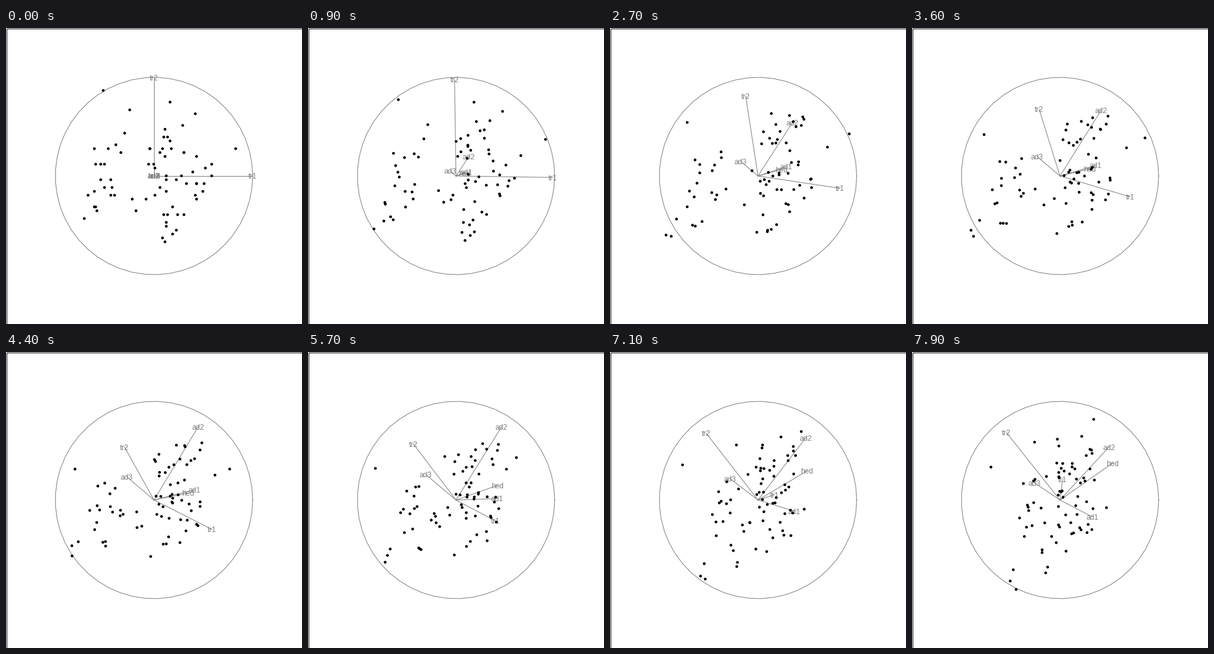
A matplotlib script that plays this animation: 480x480 px, repeating every 8000 ms.

```python
import numpy as np
import matplotlib.pyplot as plt
from matplotlib.animation import FuncAnimation

SIZE, DPI = 480, 100
MID, RADIUS = SIZE / 2, SIZE / 3
PX = 72 / DPI  # one pixel in points
GREY = "#7f7f7f"
LABELS = ["tr1", "tr2", "hed", "ad1", "ad2", "ad3"]

# Six measurements of 74 specimens, one array per variable
TR1 = np.array([
    191, 185, 200, 173, 171, 160, 188, 186, 174, 163, 190, 174, 201, 190, 182,
    184, 177, 178, 210, 182, 186, 158, 146, 151, 122, 138, 132, 131, 135, 125,
    130, 130, 138, 130, 143, 154, 147, 141, 131, 144, 137, 143, 135, 186, 211,
    201, 242, 184, 211, 217, 223, 208, 199, 211, 218, 203, 192, 195, 211, 187,
    192, 223, 188, 216, 185, 178, 187, 187, 201, 187, 210, 196, 195, 187])
TR2 = np.array([
    131, 134, 137, 127, 118, 118, 134, 129, 131, 115, 143, 131, 130, 133, 130,
    131, 127, 126, 140, 121, 136, 141, 119, 130, 113, 121, 115, 127, 123, 119,
    120, 131, 127, 116, 123, 135, 132, 131, 116, 121, 146, 119, 127, 107, 122,
    114, 131, 108, 118, 122, 127, 125, 124, 129, 126, 122, 116, 123, 122, 123,
    109, 124, 114, 120, 114, 119, 111, 112, 130, 120, 119, 114, 110, 124])
HED = np.array([
    53, 50, 52, 50, 49, 47, 54, 51, 52, 47, 52, 50, 51, 53, 51,
    51, 49, 53, 54, 51, 56, 58, 51, 51, 45, 53, 49, 51, 50, 51,
    48, 51, 52, 52, 54, 56, 54, 51, 47, 53, 53, 53, 52, 49, 49,
    47, 54, 43, 51, 49, 51, 50, 46, 49, 49, 49, 49, 47, 48, 47,
    46, 53, 48, 50, 46, 47, 49, 49, 54, 47, 50, 51, 49, 49])
AD1 = np.array([
    150, 147, 144, 144, 153, 140, 151, 143, 144, 142, 141, 150, 148, 154, 147,
    137, 134, 157, 149, 147, 148, 145, 140, 140, 131, 139, 139, 136, 129, 140,
    137, 141, 138, 143, 142, 144, 138, 140, 130, 137, 137, 136, 140, 120, 123,
    130, 131, 116, 122, 127, 132, 125, 119, 122, 120, 119, 123, 125, 125, 129,
    130, 129, 122, 129, 124, 120, 119, 119, 133, 121, 128, 129, 124, 129])
AD2 = np.array([
    15, 13, 14, 16, 13, 15, 14, 14, 14, 15, 13, 15, 13, 15, 14,
    14, 15, 14, 13, 13, 14, 8, 11, 11, 10, 11, 10, 12, 11, 10,
    9, 11, 9, 9, 11, 10, 10, 10, 9, 11, 10, 9, 10, 14, 16,
    14, 16, 16, 15, 15, 16, 14, 13, 13, 15, 14, 15, 15, 14, 14,
    13, 13, 12, 15, 15, 13, 16, 14, 13, 15, 14, 14, 13, 14])
AD3 = np.array([
    104, 105, 102, 97, 106, 99, 98, 110, 116, 95, 99, 105, 110, 106, 105,
    95, 105, 116, 107, 111, 111, 107, 111, 113, 102, 106, 98, 107, 107, 110,
    106, 108, 101, 111, 95, 123, 102, 106, 102, 104, 113, 105, 108, 84, 95,
    74, 90, 75, 90, 73, 84, 88, 78, 83, 85, 73, 90, 77, 73, 75,
    90, 82, 74, 86, 92, 78, 66, 55, 84, 86, 68, 86, 89, 88])


def standardise(cols):
    """Scale each variable to unit range, centre, fit the cloud to the stage."""
    x = np.column_stack(cols).astype(float)
    x /= np.ptp(x, axis=0)
    x -= x.mean(axis=0)
    return x / np.linalg.norm(x, axis=1).max() * MID


def orthonormal(xs, ys):
    u, _, vt = np.linalg.svd(np.column_stack([xs, ys]), full_matrices=False)
    return u @ vt


def geodesic(start, end):
    """Shortest path between two planes, as a function of 0..1."""
    u, cos, wt = np.linalg.svd(start.T @ end)
    tau = np.arccos(np.clip(cos, -1, 1))
    a = start @ u
    b = (end @ wt.T - a * np.cos(tau)) / np.sin(tau)
    return lambda t: (a * np.cos(t * tau) + b * np.sin(t * tau)) @ u.T


DATA = standardise([TR1, TR2, HED, AD1, AD2, AD3])
HOME = np.eye(6, 2)
TURN = orthonormal([82.6, -55.2, 57.9, 68.85, 72.1, -48.1],
                   [-55.2, 73.1, 10.25, 15.7, 123.5, 41.3])
LAST = orthonormal([4, -87, 85, 52, 79, -41],
                   [33.7, 109.7, 59.7, -27.3, 85.7, 27.7])
first_leg, second_leg = geodesic(HOME, TURN), geodesic(TURN, LAST)


def projection(i):
    if i < 49:
        return first_leg(i / 48.2)
    return second_leg((i - 49) / 30)


def to_stage(p):
    return MID + p * [1, -1]


fig = plt.figure(figsize=(SIZE / DPI, SIZE / DPI), dpi=DPI, facecolor="white")
ax = fig.add_axes([0, 0, 1, 1])
ax.set(xlim=(0, SIZE), ylim=(SIZE, 0))
ax.axis("off")

ax.add_patch(plt.Rectangle((0.5, 0.5), SIZE - 1, SIZE - 1, fill=False,
                           ec="black", lw=PX))
theta = np.linspace(0, 2 * np.pi, 50)
ring = to_stage(RADIUS * np.column_stack([np.cos(theta), np.sin(theta)]))
ax.plot(*ring.T, color=GREY, lw=PX)

spokes = [ax.plot([], [], color=GREY, lw=PX, zorder=2)[0] for _ in LABELS]
tags = [ax.text(MID, MID, s, color=GREY, family="Liberation Sans",
                size=12 * PX, ha="center", va="baseline", zorder=3)
        for s in LABELS]
dots = ax.scatter(*to_stage(DATA @ HOME).T, s=np.full(len(DATA), (4.5 * PX) ** 2),
                  c="black", linewidths=0, zorder=4)


def update(i):
    proj = projection(i)
    for spoke, tag, (x, y) in zip(spokes, tags, to_stage(proj * RADIUS)):
        spoke.set_data([MID, x], [MID, y])
        tag.set_position((x, y + 4.5))
    dots.set_offsets(to_stage(DATA @ proj))
    return [*spokes, *tags, dots]


anim = FuncAnimation(fig, update, frames=80, interval=100, repeat=True,
                     repeat_delay=0, blit=False)
plt.show()
```
